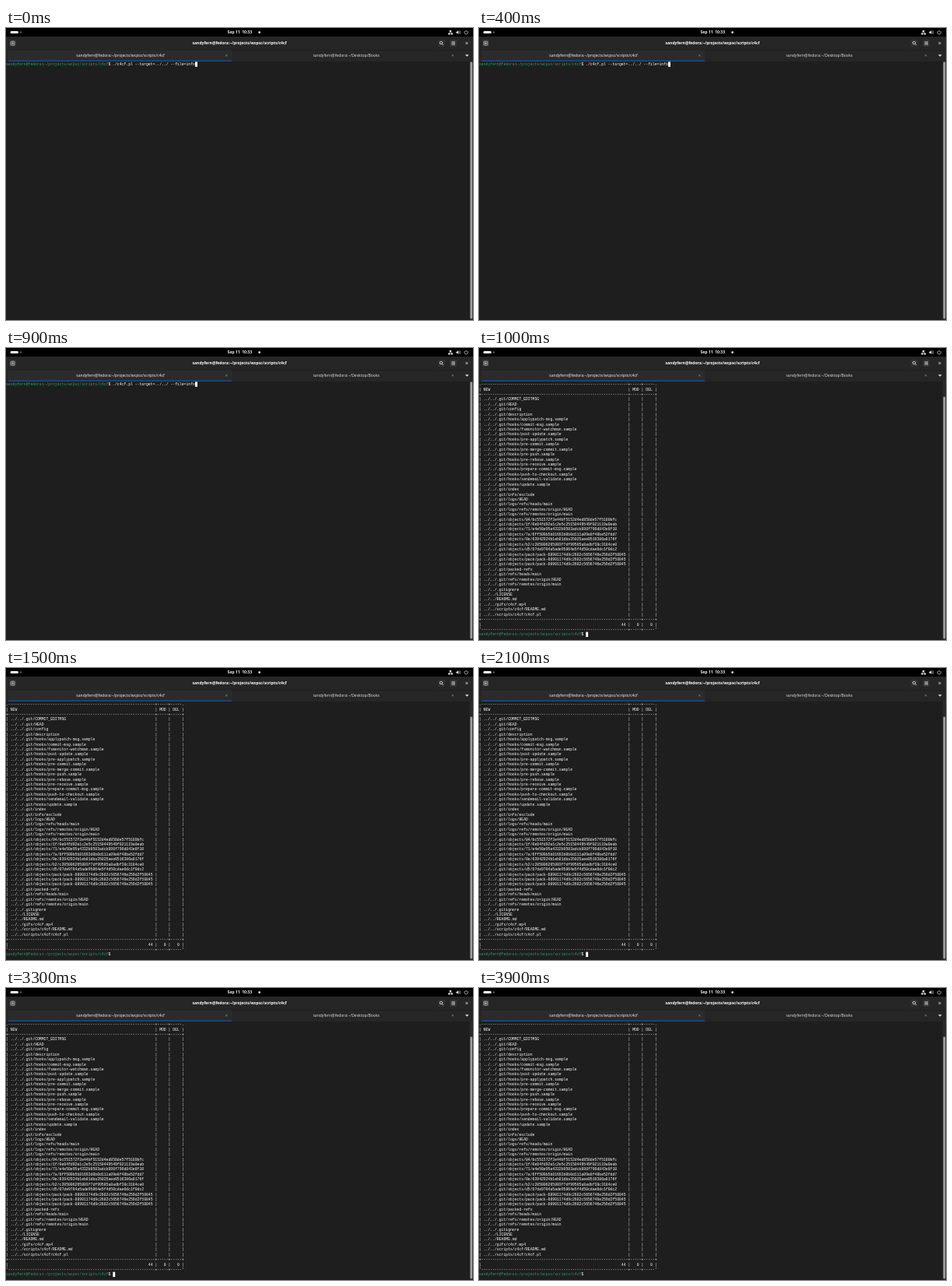
An HTML page with a canvas for the animation above (4.3 s loop, 600 px wide and 375 px high).

```html
<!DOCTYPE html>
<html lang="en">
<head>
<meta charset="utf-8">
<title>Terminal</title>
<style>
html, body { margin: 0; width: 100%; height: 100%; overflow: hidden; background: #1e1e1e; }
canvas { display: block; width: 600px; height: 375px; }
</style>
</head>
<body>
<canvas id="stage" width="600" height="375"></canvas>
<script>
const ctx = document.getElementById('stage').getContext('2d');
const LOOP = 4300, RUN_AT = 1000, BLINK_FROM = 1500, BLINK = 600;
const COL = 600 / 210, ROW = 6.425, TOP = 46.6;
const SANS = '"Noto Sans", sans-serif', MONO = '"Liberation Mono", monospace';
const FG = '#ffffff', ICON = '#e8e8e8', GREEN = '#26a269', BAR = '#262626', TERM = '#1e1e1e';
const HOST = 'sandyfern@fedora', CWD = '~/projects/wcpsc/scripts/c4cf';
const COMMAND = './c4cf.pl --target=../../ --file=info';

const git = (dir, names) => names.split(' ').map(n => '../../.git/' + dir + n);
const PACK = 'pack-88901174d9c2682c5656746e259d2f58845';
const FILES = [
  ...git('', 'COMMIT_EDITMSG HEAD config description'),
  ...git('hooks/', 'applypatch-msg commit-msg fsmonitor-watchman post-update pre-applypatch ' +
    'pre-commit pre-merge-commit pre-push pre-rebase pre-receive prepare-commit-msg ' +
    'push-to-checkout sendemail-validate update').map(n => n + '.sample'),
  ...git('', 'index info/exclude'),
  ...git('logs/', 'HEAD refs/heads/main refs/remotes/origin/HEAD refs/remotes/origin/main'),
  ...git('objects/', '04/bc551572f3e44bf5152d4ed858de57f5180bfc ' +
    '1f/0e84fd92e1c2e5c25150449549f021119a0eab ' +
    '71/e4e58e95a4332b9583adcb898f790d843e8f10 ' +
    '7a/6ff500b5b81692d0b0d111a09e8f48be52fdd7 ' +
    '0e/83942924b1eb81dba35025aee0516386a8176f ' +
    'b2/c205006265803f7df99585a8adbf38c3184ce0 ' +
    'd5/07de9784a5ade95864e5f4d50cdae6dc1f0dc2'),
  ...git('objects/pack/', [PACK, PACK, PACK].join(' ')),
  ...git('', 'packed-refs refs/heads/main refs/remotes/origin/HEAD refs/remotes/origin/main'),
  ...'.gitignore LICENSE README.md gifs/c4cf.mp4 scripts/c4cf/README.md scripts/c4cf/c4cf.pl'
    .split(' ').map(n => '../../' + n)
];

const cells = (name, mod = '', del = '') =>
  `| ${name.padEnd(64)} | ${mod.padStart(3)} | ${del.padStart(3)} |`;
const rule = end => end + '-'.repeat(66) + '+-----+-----' + end;
const TABLE = [
  rule('.'), cells('NEW', 'MOD', 'DEL'), rule('+'),
  ...FILES.map(f => cells(f)),
  rule('+'), cells(String(FILES.length).padStart(64), '0', '0'), rule("'")
];

function box(x, y, w, h, color) {
  ctx.fillStyle = color;
  ctx.fillRect(x, y, w, h);
}

function pill(x, y, w, h, r, color) {
  ctx.fillStyle = color;
  ctx.beginPath();
  ctx.roundRect(x, y, w, h, r);
  ctx.fill();
}

function dot(x, y, r, color) {
  ctx.fillStyle = color;
  ctx.beginPath();
  ctx.arc(x, y, r, 0, 7);
  ctx.fill();
}

function stroke(d, color = ICON, width = 0.7) {
  ctx.strokeStyle = color;
  ctx.lineWidth = width;
  ctx.stroke(new Path2D(d));
}

function fill(d, color = ICON) {
  ctx.fillStyle = color;
  ctx.fill(new Path2D(d));
}

function button(x) {
  pill(x - 5.3, 14.3, 10.6, 10.6, 1.8, '#1b1b1b');
  pill(x - 5, 14.6, 10, 10, 1.5, '#303030');
}

// Scaled-down large type keeps fractional glyph advances.
function label(text, x, y, color, weight = 400, size = 5.02) {
  ctx.save();
  ctx.translate(x, y);
  ctx.scale(0.25, 0.25);
  ctx.font = `${weight} ${size * 4}px ${SANS}`;
  ctx.textAlign = 'center';
  ctx.textBaseline = 'alphabetic';
  ctx.fillStyle = color;
  ctx.fillText(text, 0, 0);
  ctx.restore();
}

function print(text, col, row, color = FG) {
  ctx.save();
  ctx.translate(col * COL, TOP + row * ROW + 1.55);
  ctx.scale(0.25, 0.25);
  ctx.font = `400 ${COL / 0.6 * 4}px ${MONO}`;
  ctx.textAlign = 'left';
  ctx.textBaseline = 'alphabetic';
  ctx.fillStyle = color;
  [...text].forEach((c, i) => c !== ' ' && ctx.fillText(c, i * COL * 4, 0));
  ctx.restore();
  return col + text.length;
}

function prompt(row) {
  let col = print(HOST, 0, row, GREEN);
  col = print(':', col, row);
  col = print(CWD, col, row, GREEN);
  return print('$ ', col, row);
}

function cursor(col, row) {
  box(col * COL + 0.2, TOP + row * ROW - 3.2, COL, ROW, FG);
}

function topBar() {
  box(0, 0, 600, 11, '#000000');
  pill(5.5, 4, 10.5, 3, 1.5, FG);
  dot(19, 5.5, 0.9, '#8a8a8a');
  label('Sep 11  10:33', 300.3, 7.3, '#f2f2f2', 600);
  dot(325.6, 5.6, 1.3, FG);
  fill('M569.8 3h2.4v2h-2.4zM568.2 6.5h2.4v2h-2.4zM571.6 6.5h2.4v2h-2.4z');
  stroke('M571 5v1M569.4 6.7v-.8h3.4v.8', ICON, 0.5);
  fill('M578.3 4.7h1.3l1.7-1.6v5l-1.7-1.6h-1.3z');
  stroke('M582 4.3q1 1.3 0 2.6M583.2 3.4q1.7 2.2 0 4.4', '#d0d0d0', 0.6);
  stroke('M589.8 3.8a2.3 2.3 0 1 0 2.8 0M591.2 2.8v2.5');
}

function header() {
  box(0, 11, 600, 32, BAR);
  label(HOST + ':' + CWD, 300, 21.3, FG, 700);
  [8.6, 559.5, 574.7].forEach(button);
  ctx.strokeStyle = ICON;
  ctx.lineWidth = 0.7;
  ctx.beginPath();
  ctx.roundRect(6.2, 17.2, 4.8, 4.8, 0.8);
  ctx.stroke();
  stroke('M8.6 18.2v2.8M7.2 19.6h2.8');
  stroke('M560.7 19a1.7 1.7 0 1 1-3.4 0a1.7 1.7 0 1 1 3.4 0M560.3 20.3l1.7 1.7', ICON, 0.8);
  stroke('M572.4 17.9h4.6M572.4 19.6h4.6M572.4 21.3h4.6', ICON, 0.8);
  stroke('M590.6 18.1l2.8 2.8M593.4 18.1l-2.8 2.8', ICON, 0.8);
}

function tabs() {
  box(0, 28, 600, 0.6, '#1c1c1c');
  box(3, 28.6, 287, 13.2, '#2b2b2b');
  box(3, 41.6, 287, 1.3, '#15539e');
  label(HOST + ':' + CWD, 147, 36.9, '#eeeeee');
  label(HOST + ':~/Desktop/Books', 437.2, 36.9, '#d8d8d8');
  for (const x of [283.3, 574])
    stroke(`M${x - 1.2} 34.1l2.4 2.4M${x + 1.2} 34.1l-2.4 2.4`, '#999999', 0.6);
  fill('M590 34.2h4.6l-2.3 2.5z');
}

function scrollbar(top) {
  box(595.6, 43, 4.4, 332, '#292929');
  pill(596.4, top, 2.8, 373.5 - top, 1.4, '#a0a0a0');
}

function paint(done, lit) {
  box(0, 0, 600, 375, TERM);
  if (done) TABLE.forEach((line, row) => print(line, 0, row));
  const row = done ? TABLE.length : 0;
  let col = prompt(row);
  if (!done) col = print(COMMAND, col, row);
  if (lit) cursor(col, row);
  scrollbar(done ? 62.5 : 43.5);
  topBar();
  header();
  tabs();
}

let shown = '';
function tick() {
  const t = performance.now() % LOOP;
  const done = t >= RUN_AT;
  const lit = t < BLINK_FROM || Math.floor((t - BLINK_FROM) / BLINK) % 2 === 1;
  const state = `${done} ${lit}`;
  if (state !== shown) {
    paint(done, lit);
    shown = state;
  }
  requestAnimationFrame(tick);
}
tick();
</script>
</body>
</html>
```
